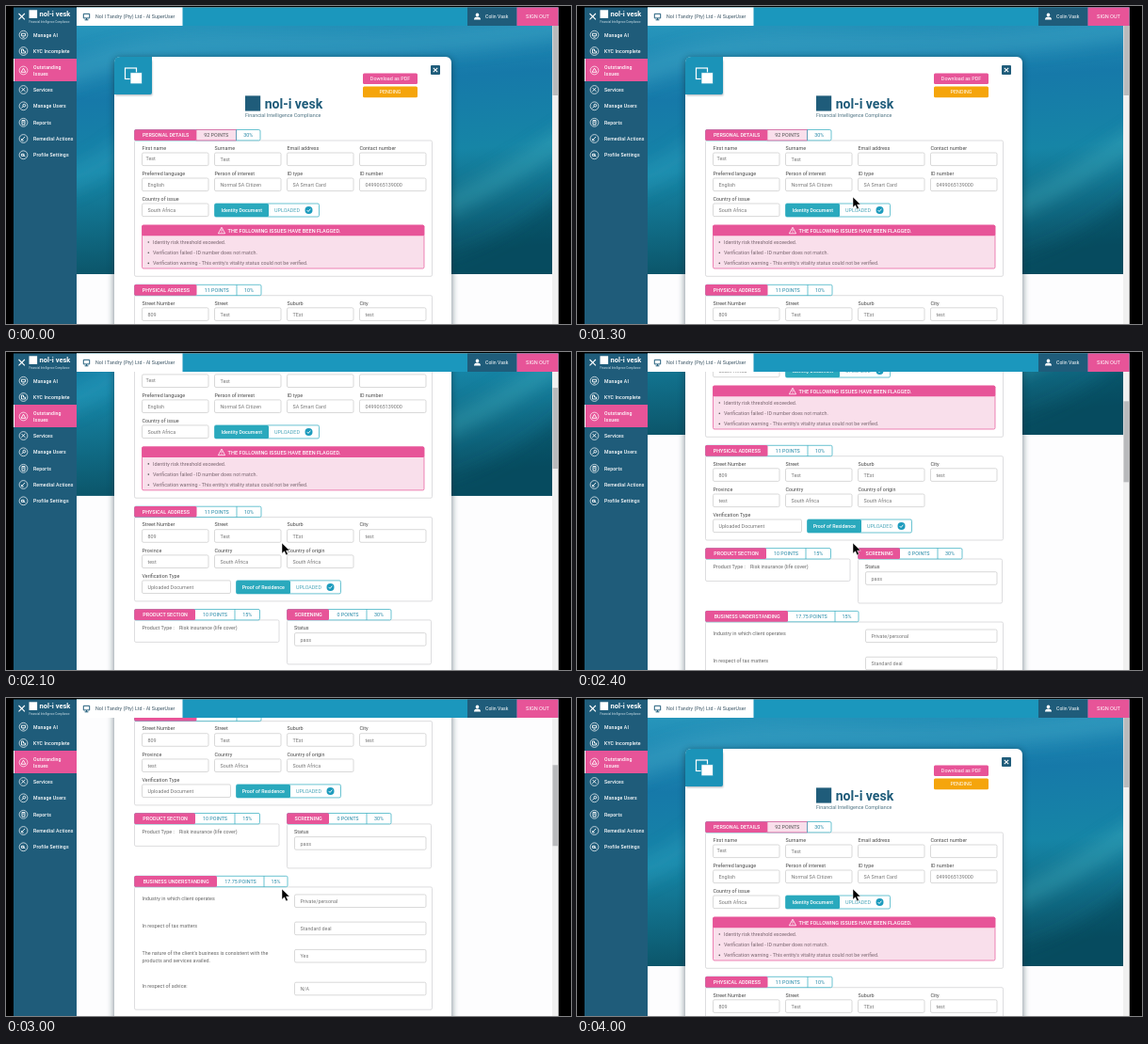
Recreate the animation shown at these times as an HTML page. Size 600 by 338 pixels, loop 4100 ms.

```html
<!DOCTYPE html>
<html lang="en">
<head>
<meta charset="utf-8">
<title>Compliance record</title>
<style>
  html, body { margin: 0; width: 100%; height: 100%; overflow: hidden; background: #000; }
  svg { display: block; width: 100%; height: 100%; }
  text { font-family: Roboto, Arial, sans-serif; font-size: 5.4px; white-space: pre; }
</style>
</head>
<body>
<svg id="stage" viewBox="0 0 600 338" xmlns="http://www.w3.org/2000/svg"></svg>
<script>
const PINK = '#e75498', TEAL = '#2aa9bd', NAVY = '#1f5c7a', BLUE = '#1b97bd';
const TOP = 1.5, RIGHT = 586.5;
const LOOP = 4100, STEP = 100, CURSOR_IN = 700;

// time, scroll offset, velocity
const KEYS = [
  [1400, 0, 0], [1800, 65.7, .2], [2400, 197, .19], [2700, 243, .12],
  [3400, 315, 0], [3500, 315, 0], [3800, 0, 0]
];

const rect = (x, y, x2, y2, fill, extra = '') =>
  `<rect x="${x}" y="${y}" width="${x2 - x}" height="${y2 - y}" fill="${fill}" ${extra}/>`;
const path = (d, stroke, width = .8, extra = 'fill="none"') =>
  `<path d="${d}" stroke="${stroke}" stroke-width="${width}" ${extra}/>`;
const dot = (x, y, r, fill, extra = '') =>
  `<circle cx="${x}" cy="${y}" r="${r}" fill="${fill}" ${extra}/>`;
// y is the vertical middle of the line
const text = (x, y, str, fill = '#444', extra = '') =>
  `<text x="${x}" y="${y + 1.95}" fill="${fill}" ${extra}>${str}</text>`;
const mid = (x, y, str, fill, extra = '') => text(x, y, str, fill, `text-anchor="middle" ${extra}`);
const line = color => `stroke="${color}" stroke-width=".7"`;

const label = (x, y, str) => text(x, y, str, '#4a4a4a');
const input = (x, y, x2, str, pad = 6) =>
  rect(x, y, x2, y + 13.6, '#fff', `rx="1.5" ${line('#c9c9c9')}`) +
  text(x + pad, y + 7, str, '#777');

const COLS = [144.5, 221.5, 298.5, 375.5], FIELD = 70.5;
const fieldRow = (y, fields) => fields.map(([name, value], i) =>
  label(COLS[i], y - 5.2, name) + input(COLS[i], y, COLS[i] + FIELD, value)).join('');

const panel = (x, y, x2, y2) => rect(x, y, x2, y2, '#fff', `rx="1.5" ${line('#cfcfd2')}`);

// heading tab followed by value tabs; edges are the x positions of the dividers
function tabs(y, edges, [title, points, share], color = PINK, edge = TEAL, tint) {
  const y2 = y + 11.4, cy = y + 5.9, [a, b, c, d = c] = edges;
  const ink = color === NAVY ? '#345' : '#2388a6';
  let out = rect(a, y, d, y2, '#fff', `rx="1.5" ${line(edge)}`);
  if (tint) out += rect(b, y, c, y2, tint, line(PINK));
  out += rect(a - .3, y - .3, b, y2, color, 'rx="1.5"') +
    mid((a + b) / 2 + .4, cy, title, '#fff', 'font-weight="500"') +
    mid((b + c) / 2, cy, points, tint ? '#555' : ink);
  if (share) out += path(`M${c} ${y}V${y2}`, edge, .7) + mid((c + d) / 2, cy, share, ink);
  return out;
}

function upload(x, y, split, x2, name) {
  const cx = x2 - 11, cy = y + 7;
  return rect(x, y, x2, y + 14, '#fff', `rx="1.5" ${line(TEAL)}`) +
    rect(x, y, split, y + 14, TEAL, 'rx="1.5"') +
    mid((x + split) / 2, cy, name, '#fff', 'font-weight="500" style="font-size:5.3px"') +
    text(split + 6, cy, 'UPLOADED', '#4aa6ba') +
    dot(cx, cy, 4, '#1c9bbd') + path(`M${cx - 1.9} ${cy}l1.4 1.5l2.4-2.8`, '#fff', .9);
}

// plain square and name standing in the brand's place
const brand = (x, y, size, color) =>
  rect(x, y - size * .45, x + size * .9, y + size * .45, color) +
  `<text x="${x + size * 1.15}" y="${y + size * .3}" fill="${color}" font-weight="700" style="font-size:${size * .78}px">nol-i vesk</text>`;

const hero = () => '<g clip-path="url(#banner)">' + rect(75, 0, 580, 285, 'url(#sea)') +
  '<g filter="url(#haze)">' +
  path('M60 75C200 10 330 70 600 20', '#5cbcd4', 22, 'fill="none" opacity=".3"') +
  path('M400 240C470 215 520 190 600 135', '#4fb9c6', 20, 'fill="none" opacity=".35"') +
  path('M60 190C90 175 110 165 140 140', '#3fb2d2', 24, 'fill="none" opacity=".25"') +
  '<path d="M380 290C470 275 540 245 600 190V300H380Z" fill="#073f52" opacity=".45"/></g></g>';

function alertBox() {
  const notes = ['Identity risk threshold exceeded.', 'Verification failed - ID number does not match.',
    "Verification warning - This entity's vitality status could not be verified."];
  return rect(144.5, 233, 444, 279, '#f9dfeb', `rx="1.5" ${line(PINK)}`) +
    rect(144.2, 232.7, 444.2, 244.2, PINK, 'rx="1.5"') +
    path('M229 235.2L232.6 241.8H225.4Z M229 237.3V239.6 M229 240.3V241', '#fff', .8) +
    text(235.6, 238.9, 'THE FOLLOWING ISSUES HAVE BEEN FLAGGED.', '#fff', 'font-weight="500" style="font-size:5.55px"') +
    notes.map((note, i) => dot(151.3, 251 + i * 11.2, .8, '#555') +
      text(156, 251 + i * 11.2, note, '#7a6670')).join('');
}

function card() {
  const deals = [
    [492, 'Private/personal', ['Industry in which client operates']],
    [521.2, 'Standard deal', ['In respect of tax matters']],
    [550.5, 'Yes', ["The nature of the client's business is consistent with the", 'products and services availed.']],
    [585.3, 'N/A', ['In respect of advice:']]
  ];
  return rect(114.5, 55, 473.5, 900, '#12303c', 'rx="6" opacity=".55" filter="url(#soft)"') +
    rect(115, 54, 473, 900, '#fff', 'rx="6"') +
    rect(116, 58, 155, 95, '#234', 'opacity=".4" filter="url(#faint)"') +
    '<path d="M115 94V60Q115 54 121 54H155V92Q155 94 153 94Z" fill="#1b93b8"/>' +
    rect(126.5, 66, 138.5, 77.5, 'none', 'stroke="#fff" stroke-width="1.2"') +
    rect(132, 70.8, 144.5, 82.8, '#fff', 'stroke="#1b93b8" stroke-width=".7"') +
    rect(451, 63, 461, 73, NAVY, 'rx="1"') + path('M453.8 65.8l4.4 4.4m0-4.4l-4.4 4.4', '#fff', 1.1) +
    rect(379, 71.5, 437, 83, PINK, 'rx="1.5"') + mid(408, 77.2, 'Download as PDF', '#fff') +
    rect(379, 85.5, 437, 97.2, '#f5a50c', 'rx="1.5"') + mid(408, 91.3, 'PENDING', '#fff') +
    brand(254, 103.5, 18, NAVY) +
    text(254, 115.8, 'Financial Intelligence Compliance', '#4f7484') +

    panel(136.5, 143, 452.5, 287.3) +
    tabs(131.5, [136.5, 202, 244.5, 270], ['PERSONAL DETAILS', '92 POINTS', '30%'], PINK, TEAL, '#f9dfeb') +
    fieldRow(156, [['First name', ''], ['Surname', 'Test'], ['Email address', ''], ['Contact number', '']]) +
    text(148.5, 162.3, 'Test', '#777') +
    fieldRow(183, [['Preferred language', 'English'], ['Person of interest', 'Normal SA Citizen'],
      ['ID type', 'SA Smart Card'], ['ID number', '0499065139000']]) +
    fieldRow(210, [['Country of issue', 'South Africa']]) +
    upload(221.5, 210, 279, 332.5, 'Identity Document') + alertBox() +

    panel(136.5, 307.7, 452.5, 397) +
    tabs(296.3, [136.5, 202.5, 245, 271], ['PHYSICAL ADDRESS', '11 POINTS', '10%']) +
    fieldRow(320.8, [['Street Number', '809'], ['Street', 'Test'], ['Suburb', 'TEst'], ['City', 'test']]) +
    fieldRow(348, [['Province', 'test'], ['Country', 'South Africa'], ['Country of origin', 'South Africa']]) +
    label(144.5, 369.8, 'Verification Type') + input(144.5, 375, 238.5, 'Uploaded Document') +
    upload(244.5, 375, 302, 355.5, 'Proof of Residence') +

    panel(136.5, 417, 290, 440.5) +
    tabs(405.6, [136.5, 201, 243, 269.5], ['PRODUCT SECTION', '10 POINTS', '15%']) +
    text(144.5, 425, 'Product Type :', '#666') + text(184, 425, 'Risk insurance (life cover)', '#666') +
    panel(298.5, 417, 451.5, 464) +
    tabs(405.6, [298.5, 343, 383, 409], ['SCREENING', '0 POINTS', '30%']) +
    label(306, 425, 'Status') + input(306.5, 430.7, 446, 'pass') +

    panel(136.5, 484, 452.5, 614.3) +
    tabs(472.4, [136.5, 224, 274, 299], ['BUSINESS UNDERSTANDING', '17.75 POINTS', '15%']) +
    deals.map(([y, value, lines]) => input(306.5, y, 446, value) +
      lines.map((s, i) => text(144.5, y + 4 + i * 7.2, s, '#666')).join('')).join('') +

    tabs(624.6, [136.5, 229, 283], ['TOTAL POINTS ACCUMULATED', '130.75 POINTS'], NAVY, NAVY) +
    tabs(646, [136.5, 201, 234.5], ['RISK PERCENTAGE', '32.86%'], NAVY, NAVY);
}

function sidebar() {
  const items = [[30.7, 'Manage AI'], [48, 'KYC Incomplete'], [68.5, 'Outstanding', 'Issues'], [89, 'Services'],
    [106.3, 'Manage Users'], [123.8, 'Reports'], [141, 'Remedial Actions'], [158.3, 'Profile Settings']];
  // glyphs are drawn around their circle's centre
  const glyphs = ['M-2-1.5h4v2.6h-4zM-1 2.5h2', 'M-2-2v4h4v-2h-2v-2z',
    'M0-2.4l2.4 4.2h-4.8z', 'M-2.1 1.8l4-4M-1.9-2l3.8 3.8',
    'M-.6-.6a1.4 1.4 0 1 1 2.8 0a1.4 1.4 0 1 1-2.8 0M-2.2 2.2l2-2', 'M-1.5-2.3h3v4.6h-3zM-.9-.7h1.8',
    'M-2 1.6l3.6-3.6M-1.8 0v2h2', 'M-2-1h2.6v2h-2.6zM0 0l2 2'];
  const style = 'font-weight="500" style="font-size:5.15px;letter-spacing:.14px"';
  return rect(8, TOP, 75, 338, NAVY) + rect(8, 56, 75, 80, PINK) + rect(8, 56, 9, 80, '#fff') +
    items.map(([y, a, b], i) =>
      `<g transform="translate(18.5 ${y})">${dot(0, 0, 4.4, 'none', line('#fff'))}${path(glyphs[i], '#fff', .9)}</g>` +
      text(29, b ? y - 3.2 : y, a, '#fff', style) + (b ? text(29, y + 3.9, b, '#fff', style) : '')).join('') +
    path('M13.5 8l6.4 6.4m0-6.4l-6.4 6.4', '#fff', 1.1) + brand(24.5, 8.6, 9.6, '#fff') +
    text(24.5, 16, 'Financial Intelligence Compliance', '#d5e4ec', 'style="font-size:2.9px"');
}

const topBar = () =>
  rect(75, TOP, RIGHT, 21, BLUE) + rect(75, TOP, 187.5, 21, '#fff') +
  rect(490, TOP, 542.5, 21, NAVY) + rect(542.5, TOP, RIGHT, 21, PINK) +
  path('M82.3 8.3h6.4v4.6h-6.4zM85.5 13v1.6M83.6 14.8h3.8', NAVY, 1) +
  text(95, 11.3, 'Nol I Tandry (Pty) Ltd - AI SuperUser', '#3c5666', 'style="font-size:5.3px"') +
  dot(500.5, 9.4, 1.8, '#fff') + '<path d="M497 14.4q0-3 3.5-3t3.5 3z" fill="#fff"/>' +
  text(509, 11.3, 'Colin Vask', '#fff', 'style="font-size:5.2px"') +
  mid(564.5, 11.3, 'SIGN OUT', '#fff', 'style="font-size:5.6px"');

const blur = (id, amount) =>
  `<filter id="${id}" x="-20%" y="-20%" width="140%" height="140%"><feGaussianBlur stdDeviation="${amount}"/></filter>`;

const stage = document.getElementById('stage');
stage.innerHTML = `<defs>
  <linearGradient id="sea" x1="0" y1="0" x2=".12" y2="1">
    <stop offset="0" stop-color="#2b9dc0"/><stop offset=".35" stop-color="#1679a9"/>
    <stop offset=".62" stop-color="#1685a6"/><stop offset="1" stop-color="#0b5468"/>
  </linearGradient>
  ${blur('haze', 9)}${blur('soft', 3.5)}${blur('faint', 1.2)}
  <clipPath id="view"><rect x="75" y="21" width="505" height="317"/></clipPath>
  <clipPath id="banner"><rect x="75" y="0" width="505" height="285"/></clipPath>
</defs>` +
  rect(0, 0, 600, 338, '#000') + rect(75, TOP, RIGHT, 338, '#fdfdfe') +
  `<g clip-path="url(#view)"><g id="page">${hero()}${card()}</g></g>` +
  rect(580, 21, RIGHT, 338, '#f0f0f0') + rect(580.5, 0, 586, 86, '#b9babc', 'id="thumb"') +
  sidebar() + topBar() +
  '<path id="cursor" d="M293 203v11.2l2.6-2.4l1.8 4l2-.9l-1.8-3.8h3.6z" fill="#000" stroke="#fff" stroke-width=".5"/>';

const [page, thumb, cursor] = ['page', 'thumb', 'cursor'].map(id => document.getElementById(id));

function scrollAt(t) {
  const i = KEYS.findIndex(k => t < k[0]);
  if (i < 1) return 0;
  const [t0, p0, v0] = KEYS[i - 1], [t1, p1, v1] = KEYS[i];
  const d = t1 - t0, u = (t - t0) / d, w = 1 - u;
  return p0 * w * w * (1 + 2 * u) + p1 * u * u * (3 - 2 * u) + d * u * w * (v0 * w - v1 * u);
}

function draw(now) {
  const t = Math.floor((now % LOOP) / STEP) * STEP;
  const s = scrollAt(t);
  page.setAttribute('transform', `translate(0 ${-s})`);
  thumb.setAttribute('y', 9 + s * .22);
  cursor.setAttribute('visibility', t < CURSOR_IN ? 'hidden' : 'visible');
}

const start = performance.now();
function tick() {
  draw(performance.now() - start);
  requestAnimationFrame(tick);
}
tick();
</script>
</body>
</html>
```
